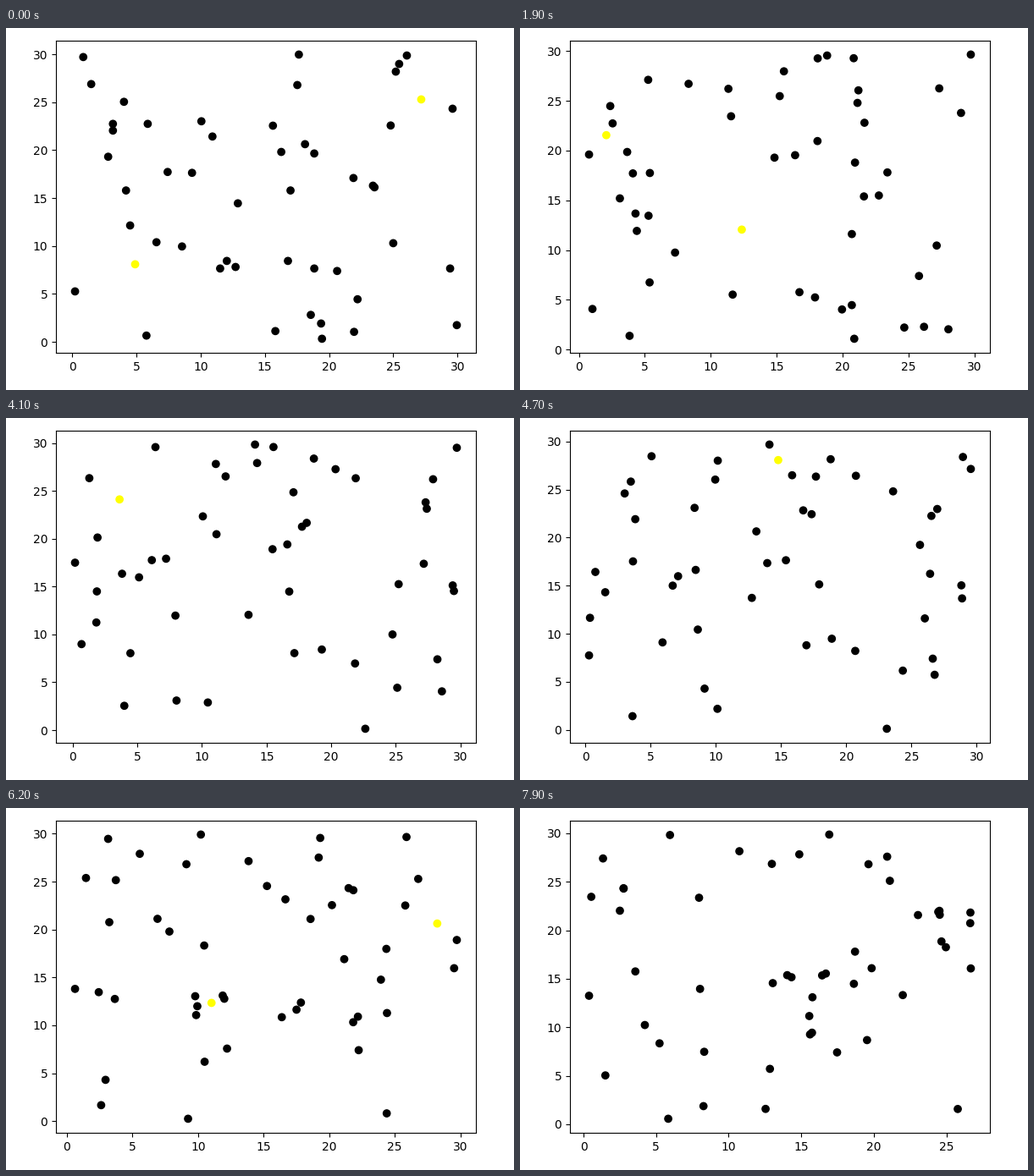
Animation of 600 by 428 pixels, one loop 8000 ms. Source, as a matplotlib script:

```python
import numpy as np
import matplotlib.pyplot as plt
from matplotlib.animation import FuncAnimation

W, H, DPI = 600, 428, 100
FRAMES, INTERVAL = 80, 100
SIDE = 30.0
FLASH_RATE = 0.055

START = np.array([
    (0.86, 29.72), (1.48, 26.9), (4.03, 25.05), (3.17, 22.75), (3.17, 22.05),
    (2.8, 19.32), (5.88, 22.75), (4.19, 15.8), (4.51, 12.15), (7.43, 17.73),
    (9.33, 17.64), (10.06, 23.02), (10.92, 21.43), (12.9, 14.46), (6.56, 10.4),
    (8.55, 9.96), (0.22, 5.27), (5.78, 0.66), (11.52, 7.66), (12.04, 8.45),
    (12.72, 7.82), (15.63, 22.56), (16.28, 19.82), (17.53, 26.8), (17.65, 29.98),
    (18.13, 20.63), (18.85, 19.66), (17.0, 15.8), (16.8, 8.45), (18.85, 7.66),
    (20.63, 7.4), (18.58, 2.82), (19.38, 1.92), (19.45, 0.33), (15.82, 1.13),
    (21.95, 1.05), (22.22, 4.45), (25.0, 10.3), (29.43, 7.66), (29.95, 1.75),
    (21.9, 17.1), (23.42, 16.3), (23.54, 16.13), (24.8, 22.58), (29.62, 24.33),
    (25.2, 28.2), (25.46, 29.0), (26.06, 29.88), (27.18, 25.3), (4.9, 8.1),
])
COUNT = len(START)

# Bursts of motion: first frame, last frame, number of moves
BURSTS = [(1, 11, 8), (13, 22, 7), (24, 33, 8), (35, 45, 8),
          (47, 57, 8), (58, 68, 8), (69, 79, 8)]
MOVES = np.concatenate([np.round(np.linspace(*b)) for b in BURSTS])

rng = np.random.default_rng(12)
velocity = rng.uniform(-0.5, 0.5, (COUNT, 2))
flash = rng.random((len(MOVES) + 1, COUNT)) < FLASH_RATE
flash[0] = np.arange(COUNT) >= COUNT - 2
flash[-1] = False


def positions(step):
    """Straight paths reflected at the walls of the box."""
    free = np.mod(START + velocity * step, 2 * SIDE)
    return SIDE - np.abs(SIDE - free)


def padded(values, margin=0.05):
    low, high = values.min(), values.max()
    pad = margin * (high - low)
    return low - pad, high + pad


fig = plt.figure(figsize=(W / DPI, H / DPI), dpi=DPI, facecolor="white")
ax = fig.add_axes([59 / W, 43.8 / H, 496 / W, 369.6 / H])
dots = ax.scatter(START[:, 0], START[:, 1], c="black")


def update(frame):
    step = np.searchsorted(MOVES, frame, side="right")
    points = positions(step)
    dots.set_offsets(points)
    dots.set_color(np.where(flash[step], "yellow", "black"))
    ax.set_xlim(*padded(points[:, 0]))
    ax.set_ylim(*padded(points[:, 1]))
    return (dots,)


anim = FuncAnimation(fig, update, frames=FRAMES, init_func=lambda: update(0),
                     interval=INTERVAL, repeat=True, repeat_delay=0, blit=False)
plt.show()
```
